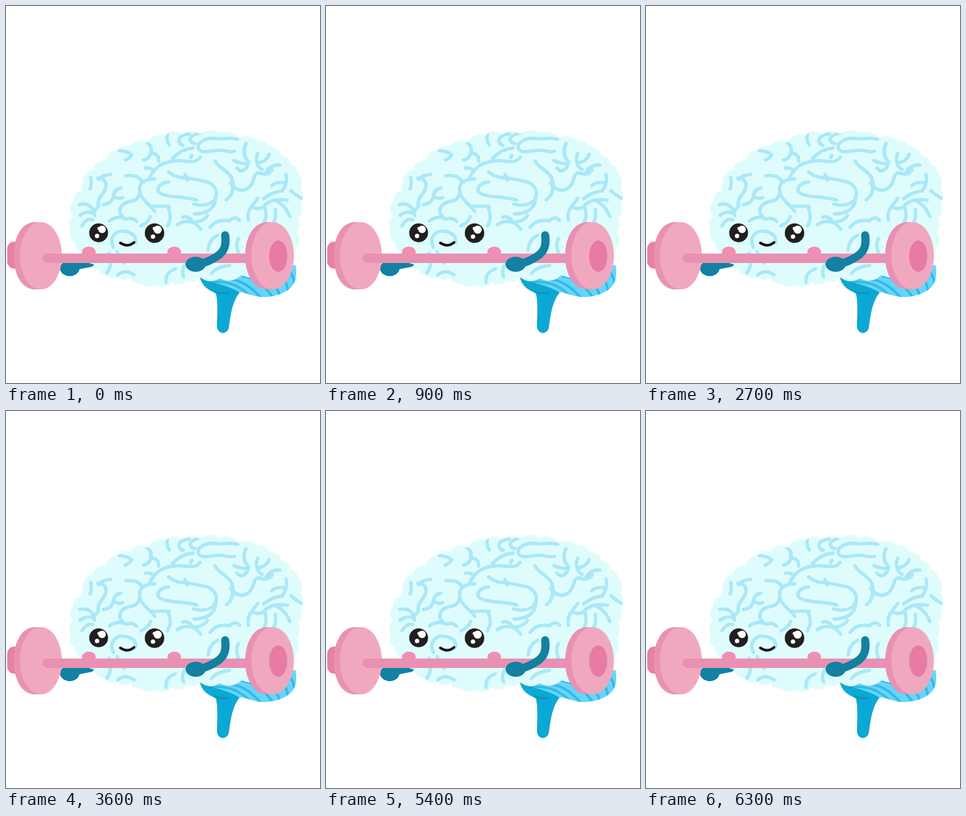
Recreate the animation shown at these times as an HTML page. Size 500 px wide and 600 px high, loop 6.33 s.

```html
<!DOCTYPE html>
<html lang="en">
<head>
<meta charset="utf-8">
<title>Brain workout</title>
<style>
  html, body { margin: 0; width: 100%; height: 100%; overflow: hidden; background: #fff; }
  svg { display: block; width: 100vw; height: 100vh; }
  .line { fill: none; stroke-linecap: round; stroke-linejoin: round; }
</style>
</head>
<body>
<svg viewBox="0 0 500 600">
  <defs>
    <clipPath id="brainClip"><path class="brain"/></clipPath>
    <clipPath id="cerebClip"><path id="cerebShape" d="M308 432 C330 440 425 420 461 412 C465 435 459 449 440 457 C425 464 406 465 391 460 C380 456 374 455 366 456 C340 456 314 448 308 432Z"/></clipPath>
  </defs>

  <!-- cerebellum and stem -->
  <use href="#cerebShape" fill="#62d7fb"/>
  <g class="line" clip-path="url(#cerebClip)" stroke="#3ab9df" stroke-width="4">
    <path d="M326 439 Q365 436 389 462"/>
    <path d="M350 434 Q382 435 407 466"/>
    <path d="M378 430 Q405 434 425 464"/>
    <path d="M402 425 Q425 432 436 460"/>
    <path d="M425 421 Q446 430 449 454"/>
    <path d="M444 418 Q458 426 459 440"/>
  </g>
  <path fill="#0ba8d5" d="M309 432 C326 441 352 443 372 456 C360 471 358 490 355 511 C353 523 338 524 336 511 C336 491 338 470 334 457 C322 452 312 446 309 432Z"/>
  <path class="line" stroke="#0794bd" stroke-width="3" d="M333 455 Q343 458 354 457"/>

  <!-- far arm -->
  <g fill="#1281a2">
    <path id="farArm" class="line" stroke="#1281a2" stroke-width="13"/>
    <ellipse id="farHand" rx="15.5" ry="12.5"/>
  </g>

  <path class="brain" fill="#dffcfd"/>
  <g class="line" clip-path="url(#brainClip)" stroke="#abe8f7" stroke-width="5.5">
    <!-- crown -->
    <path d="M180 230 Q194 231 200 237 Q197 243 190 245"/>
    <path d="M225 218 Q234 224 230 236 Q227 244 219 245"/>
    <path d="M231 234 Q244 235 243 247"/>
    <path d="M257 204 Q255 215 260 221"/>
    <path d="M292 204 C272 205 272 219 282 222"/>
    <path d="M309 202 Q292 207 293 213 Q296 219 301 219"/>
    <path d="M265 243 Q278 228 298 226"/>
    <path d="M369 212 C355 208 347 213 336 211 C320 209 305 215 306 226 C309 236 325 230 337 230 C347 227 352 235 364 231"/>
    <path d="M309 241 C301 252 287 246 275 246 C256 247 242 252 233 266 Q230 270 229 272"/>
    <path d="M294 241 L296 238"/>
    <path d="M222 258 Q232 257 235 263"/>
    <!-- centre -->
    <path d="M259 264 C271 276 291 272 310 278 C329 279 338 292 334 304 C330 317 311 319 299 315"/>
    <path d="M259 280 C246 281 239 290 243 296 C255 306 282 302 304 309"/>
    <path d="M289 277 L285 268"/>
    <path d="M237 275 C216 276 211 285 213 296 C211 307 207 309 198 311 C179 315 176 329 190 339"/>
    <path d="M191 270 Q211 268 216 279"/>
    <path d="M213 298 C218 311 229 315 237 327"/>
    <path d="M231 319 Q246 318 260 319"/>
    <path d="M257 319 Q266 335 257 350"/>
    <path d="M334 307 C332 324 317 331 300 331"/>
    <path d="M281 336 Q290 333 297 343"/>
    <path d="M273 348 C287 339 302 343 310 355"/>
    <path d="M296 344 Q315 344 321 333"/>
    <!-- front -->
    <path d="M146 274 Q161 275 159 288 Q157 296 150 304 Q146 310 147 318"/>
    <path d="M167 268 Q153 269 148 276"/>
    <path d="M135 273 Q137 283 134 291"/>
    <path d="M183 290 Q172 291 171 303 Q169 314 155 316"/>
    <path d="M171 303 Q179 308 186 305"/>
    <path d="M117 316 C131 313 140 320 141 333"/>
    <path d="M118 333 Q127 326 139 329"/>
    <path d="M141 326 L147 319"/>
    <path d="M121 350 Q128 337 138 340"/>
    <path d="M165 342 Q177 333 192 339 Q202 336 208 343"/>
    <path d="M171 384 C163 368 175 355 192 359 C203 362 208 368 206 377"/>
    <path d="M215 350 Q227 344 230 335"/>
    <path d="M160 426 Q172 408 164 394"/>
    <path d="M178 428 Q190 418 204 428"/>
    <path d="M177 391 Q180 405 188 409"/>
    <path d="M255 440 Q253 424 270 418"/>
    <path d="M283 431 Q278 421 286 410"/>
    <!-- back -->
    <path d="M333 247 C340 260 358 263 361 279 Q363 301 351 308"/>
    <path d="M357 282 Q371 299 385 290 C397 283 392 263 405 266 Q416 271 424 261"/>
    <path d="M382 219 C376 232 380 242 387 249 Q377 253 363 246"/>
    <path d="M368 258 Q376 268 385 254"/>
    <path d="M401 234 C396 245 400 257 408 260"/>
    <path d="M419 236 Q417 246 401 250"/>
    <path d="M436 253 Q421 252 414 265"/>
    <path d="M446 268 Q449 282 440 294 Q424 296 410 307"/>
    <path d="M423 286 Q430 279 445 282"/>
    <path d="M386 341 C382 325 395 315 401 306"/>
    <path d="M393 320 Q405 326 412 317 Q423 306 448 309"/>
    <path d="M430 310 Q445 317 452 335"/>
    <path d="M412 320 Q417 334 410 347"/>
    <path d="M470 306 Q460 300 454 294"/>
    <path d="M424 350 Q431 337 429 324"/>
    <path d="M325 352 Q336 338 356 342 Q365 333 372 341"/>
    <path d="M337 365 Q323 372 322 388"/>
    <path d="M370 370 Q365 380 370 393"/>
    <path d="M356 413 Q337 414 327 426"/>
  </g>

  <!-- face -->
  <g id="face">
    <g fill="#1f1f1f"><circle cx="147.500" cy="361" r="15"/><circle cx="236.500" cy="361.500" r="15.500"/></g>
    <g fill="#fff">
      <circle cx="153" cy="355.500" r="6"/><circle cx="145" cy="366" r="3.500"/>
      <circle cx="148" cy="354" r="2.500"/>
      <circle cx="241.500" cy="356" r="6.500"/><circle cx="234" cy="367" r="3.500"/>
      <circle cx="236" cy="354" r="2.500"/>
    </g>
    <path class="line" stroke="#111" stroke-width="4" d="M182 377 Q194 385 204 376"/>
    <g fill="#f08fb1"><ellipse cx="132" cy="391.500" rx="11" ry="8.500"/><ellipse cx="268" cy="391.500" rx="11" ry="8.500"/></g>
  </g>

  <!-- barbell -->
  <g id="barbell">
    <rect x="2" y="375" width="32" height="43" rx="11" fill="#e77fa7"/>
    <path fill="#e991b2" d="M46 344 H56 V451 H46 C1 451 1 344 46 344Z"/>
    <ellipse cx="55.500" cy="397.500" rx="33.500" ry="53.500" fill="#f0a8bf"/>
    <path fill="#e991b2" d="M416 344 H426 V451 H416 C369 451 369 344 416 344Z"/>
    <rect x="58" y="394" width="334" height="15" rx="7.500" fill="#e991b2"/>
    <ellipse cx="424.500" cy="397.500" rx="34" ry="53.500" fill="#f0a8bf"/>
    <ellipse cx="433.500" cy="398" rx="14.500" ry="25" fill="#e77ba3"/>
  </g>

  <!-- near arm -->
  <g fill="#1281a2">
    <path id="nearArm" class="line" stroke="#1281a2" stroke-width="13"/>
    <ellipse id="nearHand" rx="16" ry="12"/>
  </g>
</svg>
<script>
  const LOOP = 6330, BEAT = 450;
  const LIFT = { x: 19, y: -139 };
  const $ = id => document.getElementById(id);

  // Points where the scallops of the brain's edge meet, clockwise.
  const edge = [
    [103, 356], [106, 334], [106, 312], [122, 293], [122, 283], [138, 260],
    [160, 245], [179, 229], [197, 224], [226, 217], [254, 206], [281, 204],
    [309, 204], [341, 202], [370, 210], [400, 215], [419, 224], [438, 237],
    [452, 252], [466, 268], [469, 291], [469, 315], [465, 338], [463, 360],
    [459, 390], [445, 416], [412, 422], [375, 428], [340, 433], [310, 432],
    [288, 436], [264, 440], [239, 444], [215, 441], [197, 433], [177, 432],
    [158, 426], [140, 411], [122, 394], [110, 377]
  ];

  function scallops(points) {
    const start = points[points.length - 1];
    return `M${start}` + points.map((p, i) => {
      const q = points[(i || points.length) - 1];
      const r = Math.hypot(p[0] - q[0], p[1] - q[1]) * 0.78;
      return `A${r} ${r} 0 0 1 ${p}`;
    }).join('') + 'Z';
  }

  const outline = scallops(edge);
  document.querySelectorAll('.brain').forEach(el => el.setAttribute('d', outline));

  const poses = [
    {
      bar: [0, 0],
      far: 'M134 409 Q120 411 107 415', farHand: [101.5, 417.5],
      near: 'M349 365 C352 386 344 395 330 402 Q320 408 306 411', nearHand: [302, 411]
    },
    {
      bar: [LIFT.x, LIFT.y],
      far: 'M124 378 C96 360 103 313 119 281', farHand: [120.5, 278.5],
      near: 'M349 365 C353 338 340 300 324 276', nearHand: [321, 272]
    }
  ];

  function placeHand(id, [x, y]) {
    $(id).setAttribute('cx', x);
    $(id).setAttribute('cy', y);
  }

  function setPose(pose) {
    $('barbell').setAttribute('transform', `translate(${pose.bar})`);
    $('farArm').setAttribute('d', pose.far);
    $('nearArm').setAttribute('d', pose.near);
    placeHand('farHand', pose.farHand);
    placeHand('nearHand', pose.nearHand);
  }

  function draw(ms) {
    setPose(poses[Math.floor(ms % LOOP / BEAT) % 2]);
  }

  const begin = performance.now();
  function tick() {
    draw(performance.now() - begin);
    requestAnimationFrame(tick);
  }
  tick();
</script>
</body>
</html>
```
